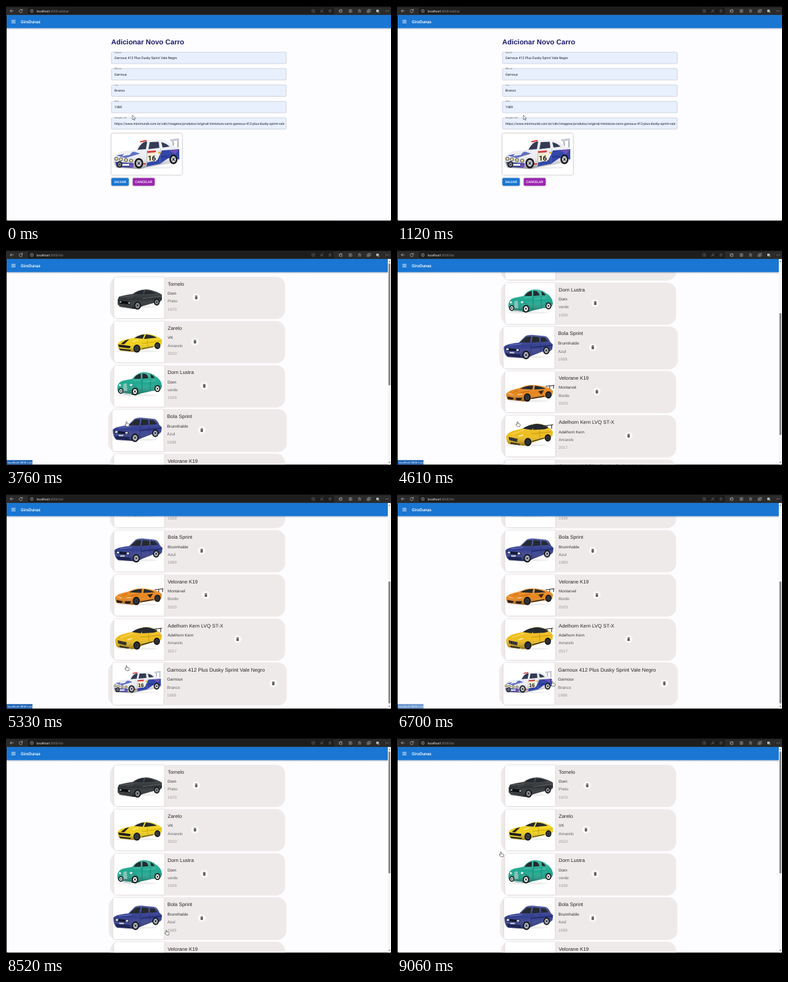
An HTML page for the animation above (9.09 s loop, 600 px wide and 338 px high).

```html
<!DOCTYPE html>
<html lang="pt-BR">
<head>
<meta charset="utf-8">
<title>Carros</title>
<style>
  html, body { margin: 0; width: 100%; height: 100%; overflow: hidden; background: #000; }
  svg { display: block; width: 100vw; height: 100vh; text-rendering: geometricPrecision; }
  .ui { font-family: Roboto, sans-serif; }
  .list { font-family: "Liberation Sans", Arial, sans-serif; }
  .photo { filter: drop-shadow(0 .5px 1px rgba(60, 40, 50, .2)); }
  .raised { filter: drop-shadow(0 .7px .8px rgba(0, 0, 0, .4)); }
</style>
</head>
<body>
<svg id="stage" viewBox="0 0 600 338" xmlns="http://www.w3.org/2000/svg"></svg>
<script>
const LOOP = 9090, LIST_AT = 3240, MAX_SCROLL = 193;
const TOP = 42, PITCH = 69.2;

const rect = (x, y, w, h, fill, more = '') =>
  `<rect x="${x}" y="${y}" width="${w}" height="${h}" fill="${fill}" ${more}/>`;
const path = (d, fill, more = '') => `<path d="${d}" fill="${fill}" ${more}/>`;
const line = (d, color, w = .7) =>
  path(d, 'none', `stroke="${color}" stroke-width="${w}" stroke-linecap="round" stroke-linejoin="round"`);
const circle = (x, y, r, fill, more = '') => `<circle cx="${x}" cy="${y}" r="${r}" fill="${fill}" ${more}/>`;
const oval = (x, y, rx, ry, fill, more = '') =>
  `<ellipse cx="${x}" cy="${y}" rx="${rx}" ry="${ry}" fill="${fill}" ${more}/>`;
const text = (x, y, size, fill, str, more = '') =>
  `<text x="${x}" y="${y}" font-size="${size}" fill="${fill}" ${more}>${str}</text>`;

const wheel = (x, y, r, rim = '#8d9094') =>
  oval(x, y, r * .85, r, '#16171a') + oval(x, y, r * .54, r * .66, rim) +
  line(`M${x - r * .4} ${y - r * .4}L${x + r * .4} ${y + r * .4}M${x - r * .4} ${y + r * .4}L${x + r * .4} ${y - r * .4}`, '#2b2d31', .6) +
  oval(x, y, r * .18, r * .22, '#2b2d31');

const shade = d => path(d, 'url(#shade)');
const ground = (x, y, rx) => oval(x, y, rx, 1.8, '#000', 'opacity=".07"');

function car(color, body, glass, wheels, extra, rim) {
  return ground(36, 47, 32) + path(body, color) + shade(body) + path(glass, '#252a30') +
    extra + wheels.map(w => wheel(...w, rim)).join('');
}

const muscle = car('#303336',
  'M6 36L8 31Q18 28 30 26.5Q38 20 50 19.5Q60 20 72 26L75 28L75 36L71 40L62 41L44 46Q38 51 30 50L10 47L6 43Z',
  'M31 26.5Q39 21 47 21L45 27.5ZM49 21L58 22L66 26L47 27.5Z', [[37, 45, 6.3], [67, 39.5, 5.4]],
  path('M8 37L26 39L26 43L9 42Z', '#0d0e10') + circle(10.5, 39.2, 1.2, '#c9ccd0') + circle(24, 40.8, 1.4, '#c9ccd0') +
  line('M11 32L30 29.5M45 34L74 30', '#777b80', .6) + line('M20 34L30 32', '#55595e', .8) + line('M8 46L28 49', '#84888d', .5));

const coupe = car('#f1d019',
  'M6 36Q8 31 18 29L33 26Q41 20 52 20Q63 21 71 26L75 29L75 36L70 39L62 41L42 45Q36 49 28 48L10 46Q6 43 6 36Z',
  'M32 26.5Q40 21 48 21L45 27.5ZM50 21Q60 21.5 67 26L47 28Z', [[36, 43, 6.3], [68, 38.5, 5.4]],
  path('M7 36.5L26 39L25 42.5L8 40.5Z', '#1c1d1c') + path('M18 30L24 28.5L16 36.5L11 35.5Z', '#2b2a22') +
  path('M8 43L27 45L26 47L10 45.5Z', '#2b2a1d') + line('M44 35L74 31M52 29L53 40', '#a98d0c', .6) +
  line('M29 32L38 30', '#fff3a6', 1) + line('M44 43.5L61 40', '#3a340f', 1), '#3e4145');

const classic = car('#20a890',
  'M6 32Q8 24 19 23L29 21Q35 12 46 10.5Q58 10.5 65 17Q74 22 75 32Q75 37 70 39L60 40L42 44Q36 47 29 46L9 44Q4 40 6 32Z',
  'M31 21Q35 14 42 13L42 21ZM44.5 13Q52 12 54 20L44.5 21ZM57 13.5Q62 16 63.5 20L58 20Z',
  [[11, 40, 4.5], [33, 41, 6], [68, 36.5, 5.4]],
  path('M15 29L20 28L21 40L15 40Z', '#88c4b8') + circle(9.5, 31, 1.7, '#e4efec') + circle(27, 31, 2, '#e4efec') +
  line('M24 34Q32 28 40 39M44 23L44 41M57 22L57 39M60 36Q67 27 74 33', '#0e7565', .7) +
  line('M31 24L41 23M46 26L64 24', '#7bd5c4', .6) + line('M6 43L27 45', '#d2dad8', 1.2), '#eef0ec');

const hatch = car('#343f90',
  'M1 32Q3 27 24 25L34 15Q37 13 44 13L64 15Q69 16 72 24L76 28L75 35L72 38L62 38L44 45L36 49L7 47Q1 44 1 32Z',
  'M26 24.5L35.5 16L43 15.5L41 25ZM45 15.5L55 16.5L55.5 24L43.5 25ZM57 16.5L64 17.5L69 23L57.5 24Z',
  [[35, 44, 6.6], [66, 37, 5.9]],
  path('M3 33L25 35L25 38.5L4 37Z', '#14182f') + rect(4.5, 33.7, 4, 2.8, '#d8dce8', 'rx="1"') +
  rect(20, 35, 4, 2.8, '#d8dce8', 'rx="1"') + path('M4 41L26 43L26 47L7 46Z', '#1e2556') +
  rect(10, 39.5, 7, 2, '#d5d8e3') + line('M43 33L74 29', '#161c4a', .9) +
  line('M43 26L42 43M56.5 25L57 38', '#1d2664', .5) + line('M10 29L28 27', '#7c88cd', .8), '#b4b9c6');

const sport = car('#e7861d',
  'M2 36Q6 30 22 27Q34 21 46 22Q60 23 70 27L75 31L74 38L68 41L61 41L41 44Q34 49 26 47L5 45Q2 42 2 36Z',
  'M24 28Q34 22.5 44 23L43 29ZM47 23L57 25L64 28L46 29Z', [[35, 41.5, 6.5], [68, 37.5, 5.7]],
  path('M4 40L14 42L12 45L5 44Z', '#2b1e14') + path('M17 42L27 42L25 46L18 46Z', '#2b1e14') +
  path('M52 32L61 30L57 37Z', '#3c2614') + line('M64 24L77 22.5M70 27L70 23.5M76 27L76 23', '#29211c', 1.1) +
  line('M6 35L12 37M20 37L27 36', '#f9e3bf', 1) + line('M42 43L61 39.5', '#33261b', 1.4) +
  line('M14 33L21 30M25 34L39 31', '#9c500c', .6), '#34373a');

const tourer = car('#eebd1c',
  'M2 33Q5 26 18 23L32 20Q40 13 52 13Q64 15 72 22L75 26L74 33L68 36L61 37L42 43Q36 49 25 47L6 45Q2 41 2 33Z',
  'M28 21Q38 14 46 14.5Q46 19 42 23ZM45 14Q58 12 68 20L62 22L44 23Z', [[36, 42, 6.5], [67, 35.5, 5.8]],
  path('M6 34L20 37L19 42L7 39Z', '#25221b') + line('M9 34.5L9 39.5M12 35.5L12 40M15 36L15 41M18 37L18 41', '#96958e', .5) +
  line('M62 16.5L75 15M66 19.5L66 17M73 21L73 16', '#25221b', 1.1) + line('M22 33L28 31', '#fff1bd', 1.5) +
  line('M43 41L61 36', '#3a3118', 1.3) + line('M42 29L72 26M54 24L55 37', '#a47f0d', .6) +
  line('M11 30L30 23', '#ffe588', .8) + path('M9 42L24 45L23 47L9 45Z', '#3d351e'), '#303236');

const rallyBody = 'M4 39Q6 31 19 28L39 26Q44 13 53 11L80 10Q91 13 98 20L106 25L107 41L97 46L57 53L45 56L9 54Q3 49 4 39Z';
const rally = ground(52, 54, 46) + path(rallyBody, '#edeef4') + shade(rallyBody) +
  path('M41 26Q46 15 54 13L56 13.5L54 25ZM60 14L74 13.5L75 23L58 25ZM78 14Q86 16 91 21L80 22.5Z', '#333b55') +
  path('M79 27L106 25L106 41L89 39L76 48L55 52L56 46L72 42Z', '#3347a8') +
  path('M8 35L36 29L45 32L22 39Z', '#6170c2') + path('M90 27L105 25.5L100 33Z', '#7350b5') +
  path('M20 32L33 29L29 34L17 36Z', '#eef0f5') + path('M56 28L70 27L69 30L56 31Z', '#d83a3c') +
  rect(55, 31, 15, 13, '#f5edcf') + text(57, 42.5, 11, '#15161c', '16', 'font-weight="700"') +
  rect(75, 35, 15, 3.5, '#283b9a') + rect(73, 29, 4, 3, '#e7b92f') + rect(49, 47, 5, 2, '#d33b3a') +
  rect(45, 11.5, 10, 2, '#d33b3a', 'transform="rotate(-12 50 12)"') +
  path('M6 45L35 47L34 54L9 53Z', '#3c449c') + rect(17, 48, 11, 3, '#eceef2') + path('M29 49L35 48L34 54L28 53Z', '#7350b5') +
  [8, 15, 23, 31].map((x, i) => circle(x, 40 + i, 2.8, '#33363c') + circle(x, 40 + i, 2, '#e9dd9b')).join('') +
  path('M91 10L105 8L106 11L93 13Z', '#c3c8db') + line('M97 19L96 13M104 22L104 12', '#474d66', .9) +
  line('M56 27L55 48M77 25L76 46', '#8c91a5', .5) +
  wheel(13, 49, 5) + wheel(43, 47, 8, '#c3c6cc') + wheel(97, 41, 7.4, '#c3c6cc');

const NEW_CAR = 'Garnoux 412 Plus Dusky Sprint Vale Negro';
const cars = [
  ['Tornelo', 'Dorn', 'Preto', 1970, 296.5, muscle],
  ['Zarelo', 'VK', 'Amarelo', 2010, 294.5, coupe],
  ['Dorn Lustra', 'Dorn', 'verde', 1939, 309, classic],
  ['Bola Sprint', 'Brunnhalde', 'Azul', 1989, 305, hatch],
  ['Velorane K19', 'Montarvel', 'Bordo', 2023, 311.5, sport],
  ['Adelhorn Kern LVQ ST-X', 'Adelhorn Kern', 'Amarelo', 2017, 361, tourer],
  [NEW_CAR, 'Garnoux', 'Branco', 1989, 414.3, `<g transform="translate(-.8 7.3) scale(.71)">${rally}</g>`]
];

function trash(x, y) {
  return `<g transform="translate(${x} ${y})">` + circle(0, 0, 6, '#fbf9f9') +
    path('M-2.1 -2.6H-1L-.6 -3.1H.6L1 -2.6H2.1V-1.9H-2.1ZM-1.8 -1.5H1.8V2.3Q1.8 2.9 1.2 2.9H-1.2Q-1.8 2.9 -1.8 2.3Z', '#5c5c5c') + '</g>';
}

function card([name, brand, color, year, binX, art], i) {
  const y = TOP + i * PITCH;
  return `<g class="card">` + rect(162, y, 273, 66, '#efeaea', 'rx="14"') +
    path(`M172 ${y + .5}H246.6V${y + 64.8}H172Q168.4 ${y + 64.8} 168.4 ${y + 59}V${y + 6}Q168.4 ${y + .5} 172 ${y + .5}Z`, '#fff', 'class="photo"') +
    `<g transform="translate(168 ${y})">${art}</g>` +
    text(252, y + 13.7, 7.8, '#262626', name) + text(252, y + 28.2, 6.25, '#333', brand) +
    text(252, y + 40.4, 6.25, '#666', color) + text(252, y + 52.7, 6.25, '#9b9b9b', year) +
    trash(binX, y + 32.2) + '</g>';
}

function field(label, value, i) {
  const y = 72.3 + i * 25.65, w = label.length * 1.95 + 2;
  return rect(164.3, y, 272.4, 17.8, '#e8f0fe', 'rx="1.6" stroke="#b9bec9" stroke-width=".6"') +
    rect(168, y - .5, w, .9, '#fdfcfe') + text(169, y + 1.2, 3.8, '#6b6b6b', label) +
    text(169, y + 10.7, 5.2, '#1d1f24', value, 'clip-path="url(#inputClip)"');
}

const button = (id, x, w, fill, label) =>
  rect(x, 269.2, w, 12, fill, `id="${id}" rx="1.6" class="raised"`) +
  text(x + w / 2, 277, 5.05, '#fff', label, 'text-anchor="middle" font-weight="500" letter-spacing=".1"');

function form() {
  const url = 'https://www.minimundi.com.br/cdn/imagens/produtos/original/miniatura-carro-garnoux-412-plus-dusky-sprint-vale-negro';
  const rows = [['Nome', NEW_CAR], ['Marca', 'Garnoux'], ['Cor', 'Branco'], ['Ano', '1989'], ['Imagem Url', url]];
  return text(164, 60, 11, '#1b1c70', 'Adicionar Novo Carro', 'class="list" font-weight="700"') +
    rows.map(([label, value], i) => field(label, value, i)).join('') +
    rect(164.3, 199.5, 110, 64.5, '#fff', 'rx="1.5" class="raised"') +
    `<g transform="translate(164 199)">${rally}</g>` +
    button('save', 164.3, 27, '#1976d2', 'SALVAR') + button('cancel', 197.6, 34, '#9c27b0', 'CANCELAR') +
    circle(186, 273, 0, '#fff', 'id="ripple" clip-path="url(#saveClip)"');
}

function browser() {
  const star = (x, c) => line(`M${x} 5.4L${x + .7} 7H${x + 2.3}L${x + 1.1} 8.1L${x + 1.5} 9.9L${x} 8.9L${x - 1.5} 9.9L${x - 1.1} 8.1L${x - 2.3} 7H${x - .7}Z`, c, .5);
  const c = '#c0c0c0', g = '#777';
  return rect(0, 0, 600, 14, '#2b2b2b') + rect(0, 0, 600, 1.5, '#070707') + rect(34, 2.6, 477, 10.2, '#1d1d1d', 'rx="2"') +
    line('M11.5 7.7H6.7M8.7 5.6L6.6 7.7L8.7 9.8', c) + line('M25.2 6.6A2.5 2.5 0 1 0 25.5 8.4M25.4 5V6.8H23.6', c) +
    circle(40.3, 7.8, 2.3, 'none', `stroke="${c}" stroke-width=".6"`) + line('M40.3 7.6V9M40.3 6.4V6.5', c, .6) +
    `<text x="47.6" y="9.5" font-size="5" fill="#f2f2f2">localhost<tspan fill="#8a8a8a" id="route"></tspan></text>` +
    line('M477 5.6H481V10H477ZM479 5.6V10M477 7.8H481', g, .4) + line('M490 10L492 5.5L494 10M490.8 8.4H493.2M494.5 6V5', g, .5) + star(505, g) +
    line('M520 6.2H523.6V9.8H520ZM519.2 7.7H520M522 5.4V6.2', c, .7) + line('M535 5.9H537V9.8H535ZM537 5.9H539V9.8H537Z', c, .5) +
    star(551, c) + line('M563 6.7H566.6V10.2H563ZM564.5 5.4H568.2V9M564.8 7.6V9.4M563.9 8.5H565.7', c, .5) +
    rect(577, 5.8, 4, 3.8, c, 'rx=".8"') + circle(580.8, 9.4, 1.3, '#5b8f52') +
    [592, 594, 596].map(x => circle(x, 7.8, .5, c)).join('');
}

const stage = document.getElementById('stage');
stage.innerHTML = `<defs>
  <linearGradient id="shade" x1="0" y1="0" x2="0" y2="1">
    <stop offset="0" stop-color="#fff" stop-opacity=".18"/><stop offset=".5" stop-color="#fff" stop-opacity="0"/>
    <stop offset="1" stop-color="#000" stop-opacity=".4"/></linearGradient>
  <linearGradient id="drop" x1="0" y1="0" x2="0" y2="1">
    <stop offset="0" stop-color="#1c3450" stop-opacity=".28"/><stop offset="1" stop-color="#1c3450" stop-opacity="0"/></linearGradient>
  <clipPath id="inputClip"><rect x="168" y="70" width="265.5" height="130"/></clipPath>
  <clipPath id="saveClip"><rect x="164.3" y="269.2" width="27" height="12" rx="1.6"/></clipPath>
  <clipPath id="page"><rect x="1" y="14" width="599" height="321.8" rx="1.5"/></clipPath></defs>
  <g class="ui">` + rect(0, 0, 600, 338, '#000') +
  `<g clip-path="url(#page)">` + rect(1, 14, 599, 322, '#fdfcfe') +
  `<g id="form">${form()}</g><g id="cards" class="list">${cars.map(card).join('')}</g>` +
  rect(1, 34.7, 599, 2.6, 'url(#drop)') + rect(1, 14, 599, 20.7, '#1976d2') +
  line('M8.8 22.4H14.4M8.8 24.4H14.4M8.8 26.4H14.4', '#fff', .8) +
  text(23, 26.6, 6.5, '#fff', 'GiroDunas', 'font-weight="500" letter-spacing=".05"') +
  `<g id="bar">` + rect(595, 14, 5, 322, '#f6f6f6') + path('M596 18.4L597.5 16.4L599 18.4ZM596 331.6L597.5 333.6L599 331.6Z', '#777') +
  rect(596, 21, 3, 191, '#8a8a8a', 'id="thumb" rx="1.4"') + '</g>' +
  `<g id="status">` + rect(0, 328.8, 41.3, 7.4, '#1a5fb4', 'rx=".8"') +
  text(2.4, 334, 4.4, '#fff', '', 'id="link"') + '</g></g>' + browser() +
  path('M0 0V6.8L1.6 5.3L2.7 7.8L3.8 7.3L2.7 4.9H4.9Z', '#fff', 'id="arrow" stroke="#222" stroke-width=".55"') +
  path('M0 .6Q.8 -.5 1.5 .6V3L4.5 3.7Q5.3 4 5.1 5L4.5 7.8H.7L-1.7 5Q-1.7 3.9 -.7 4.3L0 4.9Z', '#fff', 'id="hand" stroke="#222" stroke-width=".6"') + '</g>';

const el = Object.fromEntries([...stage.querySelectorAll('[id]')].map(n => [n.id, n]));
const cardEls = [...stage.querySelectorAll('.card')];

const clamp = v => Math.min(1, Math.max(0, v));
const ramp = (t, a, b) => clamp((t - a) / (b - a));
const smooth = p => p * p * (3 - 2 * p);
const show = (node, on) => node.setAttribute('display', on ? 'inline' : 'none');

// time, x, y of the pointer tip
const track = [
  [0, 197, 171], [1850, 197, 171], [2420, 191.5, 262.5], [2600, 191.5, 262.5], [2780, 187, 271], [3240, 187, 271],
  [3600, 187, 268.5], [5360, 187, 268.5], [6150, 241.5, 293], [6750, 241.5, 293], [7100, 256, 305.5],
  [8440, 256, 305.5], [8930, 162, 236], [9040, 161, 178], [LOOP, 161, 178]
];
// card, hover start, hover end
const hovers = [[3, 3300, 4780], [6, 4780, 8400], [3, 8400, 8980]];

function pointer(t) {
  const i = track.findIndex(k => k[0] > t);
  const [a, x, y] = track[i - 1], [b, u, v] = track[i], p = smooth(ramp(t, a, b));
  return [x + (u - x) * p, y + (v - y) * p];
}

function draw(t) {
  const onList = t >= LIST_AT;
  show(el.form, !onList);
  show(el.cards, onList);
  show(el.bar, onList);
  el.route.textContent = onList ? ':3000/list' : ':3000/addcar';

  const scroll = MAX_SCROLL * (smooth(ramp(t, 4420, 4730)) - smooth(ramp(t, 7938, 8380)));
  el.cards.setAttribute('transform', `translate(0 ${-scroll})`);
  el.thumb.setAttribute('y', 21 + scroll * .6);

  cardEls.forEach((node, i) => {
    const amount = hovers.reduce((sum, [n, a, b]) =>
      n === i ? sum + smooth(ramp(t, a, a + 200)) - smooth(ramp(t, b, b + 200)) : sum, 0);
    const y = TOP + i * PITCH + 33;
    node.setAttribute('transform', `translate(298.5 ${y}) scale(${1 + .02 * amount}) translate(-298.5 ${-y})`);
  });

  show(el.status, t >= 3300 && t < 6900);
  el.status.setAttribute('opacity', 1 - ramp(t, 6600, 6900));
  el.link.textContent = `localhost:3000/cars/${t < 4780 ? 4 : 7}`;

  el.save.setAttribute('fill', t >= 2740 ? '#1565c0' : '#1976d2');
  const wave = ramp(t, 2860, 3000);
  el.ripple.setAttribute('r', 24 * wave);
  el.ripple.setAttribute('opacity', .25 * (wave > 0 ? 1 - wave : 0));

  const [x, y] = pointer(t), hand = t >= 2740;
  show(el.arrow, !hand);
  show(el.hand, hand);
  el[hand ? 'hand' : 'arrow'].setAttribute('transform', `translate(${x} ${y})`);
}

const start = performance.now();
function tick() {
  draw((performance.now() - start) % LOOP);
  requestAnimationFrame(tick);
}
tick();
</script>
</body>
</html>
```
